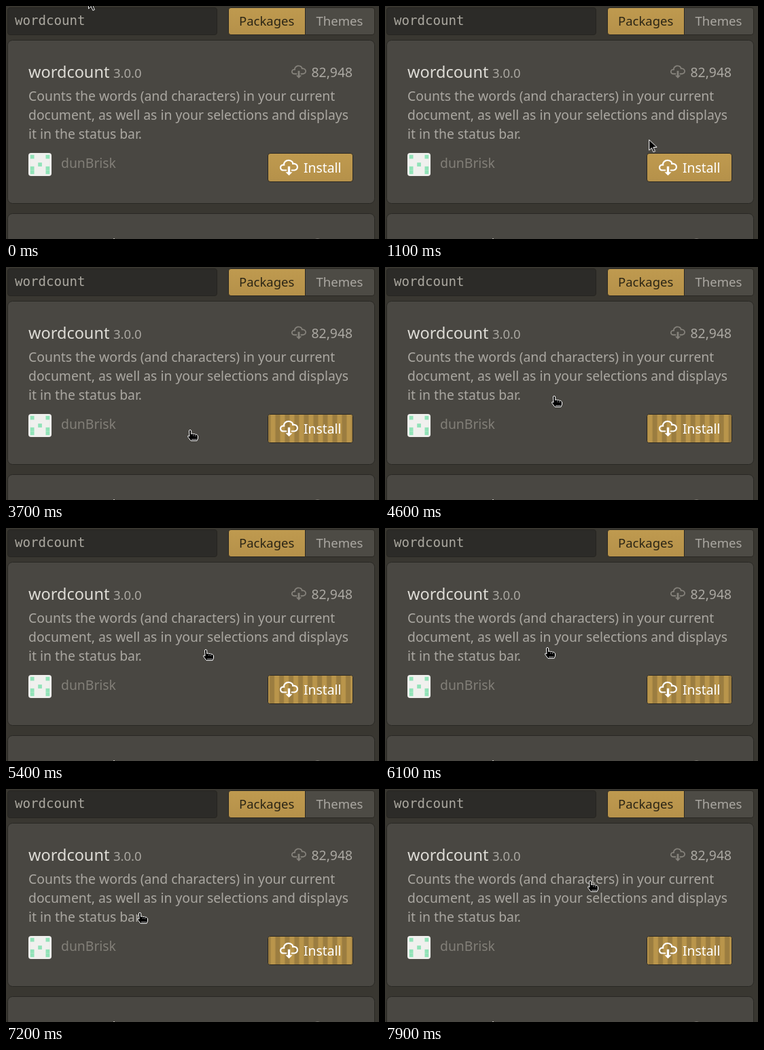
Write an HTML page that moves like this. It is 549 by 344 pixels and loops after 8000 ms.

```html
<!DOCTYPE html>
<html lang="en">
<head>
<meta charset="utf-8">
<title>Package install</title>
<style>
  html, body { margin: 0; width: 100%; height: 100%; overflow: hidden; background: #393731; }
  svg { display: block; }
  text { font-family: "Noto Sans", "Open Sans", sans-serif; fill: #aba8a2; }
  .body { font-size: 19.35px; }
  .mono { font-family: "DejaVu Sans Mono", monospace; font-size: 19.1px; fill: #aaa79f; }
  .title { font-size: 23.5px; fill: #dedcd6; }
  .small { font-size: 18.5px; }
  .card { fill: #494742; stroke: #292824; }
  .edge { stroke: #2a2823; }

  .cursor, .arrow, .hand, .pressed, .installing {
    animation: 8s steps(1) -4ms infinite;
  }
  .cursor { animation-name: wander; }
  .arrow { animation-name: arrow; }
  .hand { animation-name: hand; }
  .pressed { animation-name: pressed; }
  .installing { animation-name: installing; }
  .stripes { animation: slide .5s steps(5) -4ms infinite; }

  @keyframes arrow { 0% { opacity: 1; } 15%, 100% { opacity: 0; } }
  @keyframes hand { 0% { opacity: 0; } 15%, 100% { opacity: 1; } }
  @keyframes pressed { 0% { opacity: 0; } 28.75% { opacity: 1; } 41.25%, 100% { opacity: 0; } }
  @keyframes installing { 0% { opacity: 0; } 41.25%, 100% { opacity: 1; } }
  @keyframes slide { to { transform: translateX(14px); } }

  /* The pointer advances once every 100 ms. */
  @keyframes wander {
    0% { transform: translate(121px, -12px); }
    1.25% { transform: translate(121px, -12px); animation-timing-function: steps(6); }
    8.75% { transform: translate(323px, 146px); }
    10% { transform: translate(323px, 146px); animation-timing-function: steps(4); }
    15% { transform: translate(410px, 214px); }
    16.25% { transform: translate(475px, 232px); animation-timing-function: steps(2); }
    18.75% { transform: translate(437px, 238px); }
    40% { transform: translate(437px, 238px); animation-timing-function: steps(5); }
    46.25% { transform: translate(267px, 240px); animation-timing-function: steps(4); }
    51.25% { transform: translate(247px, 228px); animation-timing-function: steps(5); }
    57.5% { transform: translate(245px, 190px); animation-timing-function: steps(2); }
    60% { transform: translate(236px, 194px); animation-timing-function: steps(2); }
    62.5% { transform: translate(267px, 205px); animation-timing-function: steps(4); }
    67.5% { transform: translate(290px, 179px); animation-timing-function: steps(5); }
    73.75% { transform: translate(266px, 180px); animation-timing-function: steps(2); }
    76.25% { transform: translate(235px, 176px); animation-timing-function: steps(7); }
    85% { transform: translate(215px, 178px); animation-timing-function: steps(2); }
    87.5% { transform: translate(210px, 176px); }
    90% { transform: translate(193px, 182px); animation-timing-function: steps(7); }
    98.75%, 100% { transform: translate(298px, 135px); }
  }
</style>
</head>
<body>
<svg width="549" height="344" viewBox="0 0 549 344">
  <defs>
    <linearGradient id="gold" x2="0" y2="1">
      <stop stop-color="#bf9a4f"/><stop offset="1" stop-color="#b5914a"/>
    </linearGradient>
    <pattern id="bars" x="12.800" width="14" height="42" patternUnits="userSpaceOnUse">
      <rect width="14" height="42" fill="#b9954b"/>
      <rect width="7" height="42" fill="#9b7d40"/>
    </pattern>
    <clipPath id="button"><rect x="386" y="218" width="124" height="41" rx="3"/></clipPath>
    <path id="cloud" d="M9 12h2l-3 3-3-3h2V7h2zM12 4C12 3.500 11 1 7.500 1 5 1 3 3 3 5 1 5 0 6.500 0 8c0 1.500 1 3 3 3h3V9.700H3C1.400 9.700 1.300 8.300 1.300 8c0-.2 0-1.700 1.700-1.700h1.300V5c0-1.400 1.600-2.700 3.200-2.700 2.500 0 3.100 1.500 3.200 1.800v1.200H12c.8 0 2.700.2 2.700 2.200 0 2.100-2.200 2.200-2.700 2.200h-2V11h2c2 0 4-1.200 4-3.500S14 4 12 4z"/>
    <rect id="cell" width="5.700" height="5.700"/>
  </defs>

  <rect width="549" height="344" fill="#393731"/>

  <!-- Search and tabs -->
  <rect x="2.500" y="2.500" width="308" height="40" rx="3.500" fill="#2c2b28" stroke="#262521"/>
  <text class="mono" x="13" y="28">wordcount</text>
  <path class="edge" fill="#4d4b45" d="M440.500 2.500H539a3.500 3.500 0 0 1 3.500 3.500V39a3.500 3.500 0 0 1-3.500 3.500H440.500z"/>
  <path class="edge" fill="url(#gold)" d="M440.500 2.500V42.500H331a3.500 3.500 0 0 1-3.500-3.500V6a3.500 3.500 0 0 1 3.500-3.500z"/>
  <text class="small" x="343" y="29" style="fill:#2b2515">Packages</text>
  <text class="small" x="456.500" y="29">Themes</text>

  <!-- Package card -->
  <rect class="card" x="2.500" y="50.500" width="540" height="241" rx="7"/>
  <text class="title" x="33" y="106">wordcount</text>
  <text class="small" x="158" y="106">3.0.0</text>
  <use href="#cloud" transform="translate(420 86) scale(1.375)" fill="#85827b"/>
  <text class="body" x="449.500" y="105">82,948</text>
  <g class="body">
    <text x="33" y="140">Counts the words (and characters) in your current</text>
    <text x="33" y="168">document, as well as in your selections and displays</text>
    <text x="33" y="196">it in the status bar.</text>
  </g>
  <rect x="33" y="217" width="34" height="34" rx="4" fill="#f0f0ee"/>
  <g fill="#91e3b8">
    <use href="#cell" x="35.800" y="219.800"/><use href="#cell" x="58.500" y="219.800"/>
    <use href="#cell" x="47.200" y="231.200"/>
    <use href="#cell" x="35.800" y="236.800"/><use href="#cell" x="58.500" y="236.800"/>
    <use href="#cell" x="35.800" y="242.500"/><use href="#cell" x="58.500" y="242.500"/>
  </g>
  <text class="body" x="81" y="239" style="fill:#827f78">dunBrisk</text>

  <!-- Install button -->
  <rect class="edge" x="385.500" y="217.500" width="125" height="42" rx="3.500" fill="url(#gold)"/>
  <rect class="pressed" x="384.500" y="216.500" width="127" height="44" rx="4" fill="#a38544" stroke="#e6b351" stroke-width="2.200"/>
  <g class="installing" clip-path="url(#button)">
    <rect class="stripes" x="368" y="217" width="144" height="43" fill="url(#bars)"/>
  </g>
  <use href="#cloud" transform="translate(403 225) scale(1.690)" fill="#fff"/>
  <text class="body" x="438" y="246" style="fill:#fff">Install</text>

  <!-- Next card -->
  <rect class="card" x="2.500" y="306.500" width="540" height="60" rx="7"/>
  <path d="M158 343h2v1h-2z" fill="#bebbb5"/>
  <path d="M455 344q3.500-1.500 7 0z" fill="#85827b"/>

  <g class="cursor" stroke="#fff" stroke-linejoin="round">
    <path class="arrow" d="M.5.5V16l3.800-3.500 2.500 6 2.500-1-2.500-6H12z"/>
    <g class="hand">
      <path d="M2.500 2Q2.500.5 4 .5T5.700 2V6.500Q7.500 5.300 8.800 6.600 10.500 5.800 11.700 7.200 13.200 6.700 14.300 8 15.500 8.500 15.500 10V13L14 16.500H5L1.200 11.500Q0 9.500 1.200 9L3 10z"/>
      <path d="M8.800 8v1.500M11.600 8.500V10M6 14.500h7.500" stroke-width=".7" fill="none"/>
    </g>
  </g>
</svg>
</body>
</html>
```
